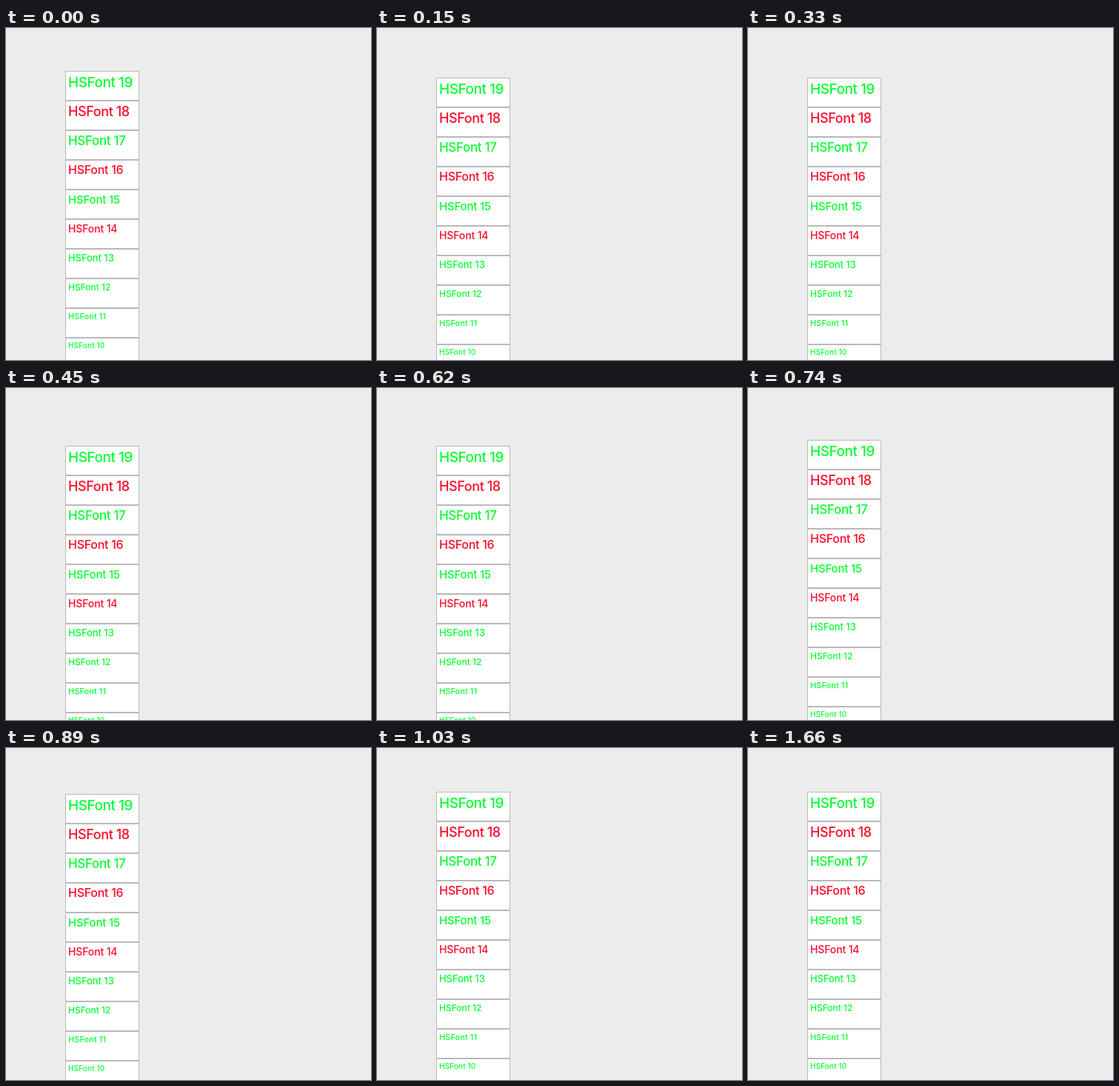
Write an HTML page with a canvas that moves like this. It is 493 px wide and 448 px high and loops after 2.08 s.

```html
<!DOCTYPE html>
<html lang="en">
<head>
<meta charset="utf-8">
<title>Bouncing list</title>
<style>
  html, body { margin: 0; height: 100%; overflow: hidden; background: #ececec; }
  canvas { display: block; }
</style>
</head>
<body>
<canvas id="stage" width="493" height="448"></canvas>
<script>
const ctx = document.getElementById('stage').getContext('2d');
const LOOP = 2080, LEFT = 80, WIDTH = 100, ROW = 40;
const MAX_SIZE = 19, MIN_SIZE = 10;
// key poses of the overscroll, held: [start in ms, top of the list]
const poses = [[0, 58], [150, 67], [450, 78], [740, 70], [890, 62], [1030, 59]];

function drawRow(size, y) {
  ctx.fillStyle = '#fff';
  ctx.fillRect(LEFT, y, WIDTH, ROW);
  ctx.strokeStyle = '#b9b9b9';
  ctx.strokeRect(LEFT + 0.5, y + 0.5, WIDTH - 1, ROW - 1);

  const red = size >= 14 && size % 2 === 0;
  ctx.fillStyle = red ? '#ff0a2a' : '#06ff30';
  ctx.font = `500 ${size}px Inter, sans-serif`;
  // smaller sizes are set looser
  ctx.letterSpacing = `${(12 - size) * 0.067}px`;
  ctx.fillText(`HSFont ${size}`, LEFT + 4, y + Math.round(size * 0.9 + 5));
}

function draw(now) {
  const t = now % LOOP;
  const [, top] = poses.findLast(([start]) => start <= t);
  ctx.fillStyle = '#ececec';
  ctx.fillRect(0, 0, 493, 448);
  for (let size = MAX_SIZE; size >= MIN_SIZE; size--) {
    drawRow(size, top + (MAX_SIZE - size) * ROW);
  }
  requestAnimationFrame(draw);
}
draw(0);
</script>
</body>
</html>
```
